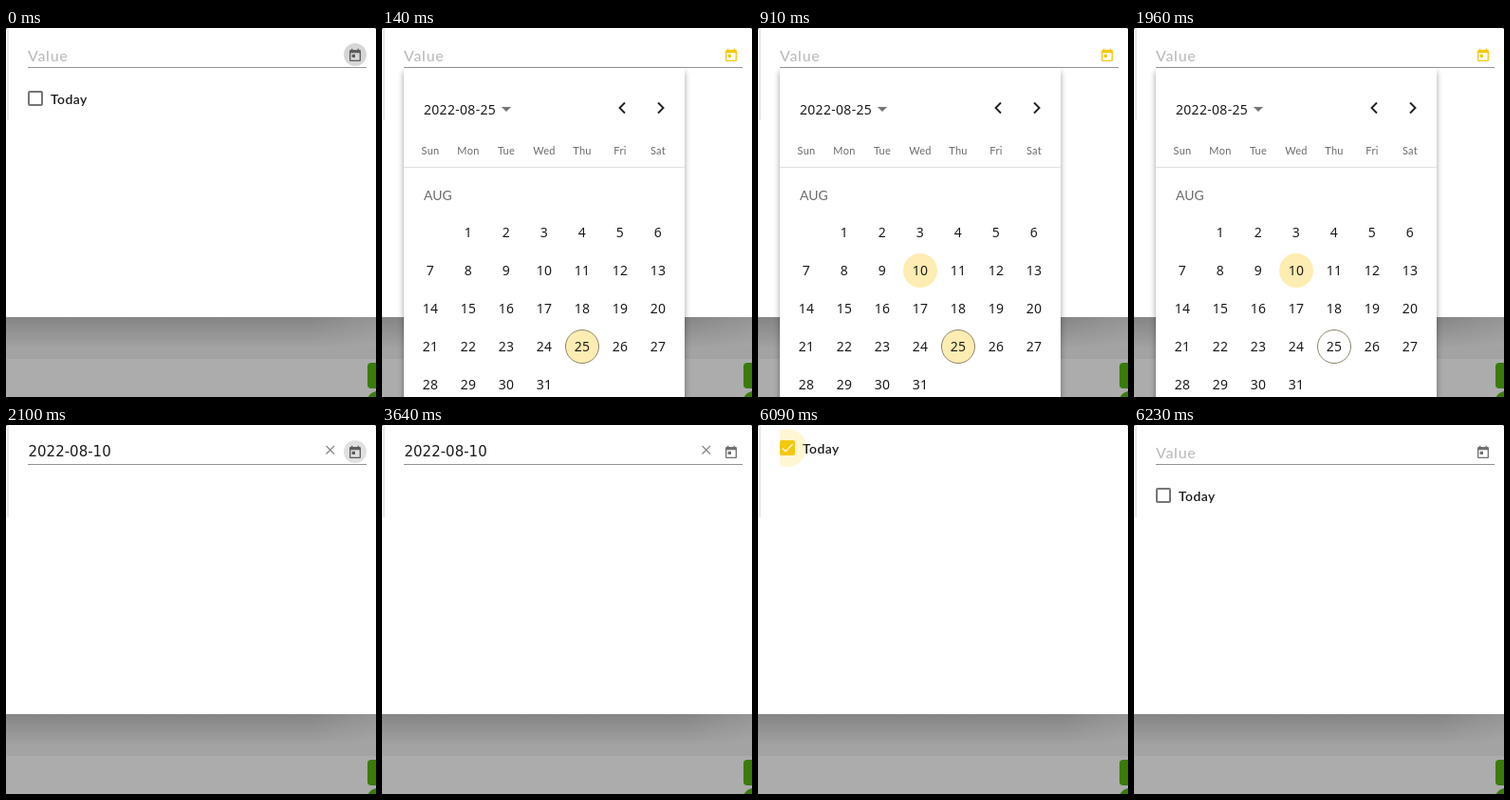
These frames come from a looping animation (390x388 px, 7280 ms). An HTML page:

```html
<!DOCTYPE html>
<html lang="en">
<head>
<meta charset="utf-8">
<title>Date field</title>
<style>
  html, body { margin: 0; width: 100%; height: 100%; overflow: hidden; background: #fff; }
  svg { display: block; width: 390px; height: 388px; }
  text { font-family: Lato, sans-serif; }
  .label { font-size: 16px; font-weight: 500; letter-spacing: .7px; fill: #bcbcbc; }
  .today { font-size: 14px; font-weight: 600; letter-spacing: .4px; fill: #1c1c1c; }
  .date { font: 15px "DejaVu Sans", sans-serif; fill: #1c1c1c; }
  .week { font-size: 11px; letter-spacing: .3px; fill: #6b6b6b; text-anchor: middle; }
  .month { font-size: 14px; fill: #6b6b6b; }
  .day, .period { font: 14px "Noto Sans", sans-serif; letter-spacing: .3px; fill: #1c1c1c; }
  .day { text-anchor: middle; }
  .popup { filter: drop-shadow(0 2px 3px rgba(0, 0, 0, .38)); }
</style>
</head>
<body>
<svg viewBox="0 0 390 388">
  <defs>
    <linearGradient id="shade" x1="0" y1="0" x2="0" y2="1">
      <stop offset="0" stop-color="#858585"/>
      <stop offset="1" stop-color="#a0a0a0"/>
    </linearGradient>
    <linearGradient id="fade">
      <stop offset="0" stop-color="#adadad" stop-opacity="0"/>
      <stop offset="1" stop-color="#adadad" stop-opacity=".4"/>
    </linearGradient>
    <clipPath id="edge"><rect x="23" y="0" width="60" height="100"/></clipPath>
  </defs>

  <rect width="390" height="388" fill="#fff"/>
  <rect x="1" width="2" height="97" fill="#e8e8e8"/>
  <path d="M0 0h1v1h-1zM389 0h1v1h-1z" fill="#777"/>
  <rect y="304" width="390" height="31" fill="url(#shade)"/>
  <rect x="320" y="304" width="70" height="31" fill="url(#fade)"/>
  <rect y="335" width="390" height="13" fill="#a3a3a3"/>
  <rect y="348" width="390" height="40" fill="#acacac"/>
  <rect x="381" y="352" width="20" height="27" rx="4" fill="#397c08"/>
  <circle cx="391" cy="392" r="10" fill="#397c08"/>

  <g id="field">
    <rect x="23" y="41" width="357" height="1" fill="#949494"/>
    <text id="label" class="label" x="23" y="35">Value</text>
    <g id="filled">
      <text class="date" x="23.5" y="33">2022-08-10</text>
      <path d="M337.5 22l8.5 8.5M346 22l-8.5 8.5" stroke="#858585" stroke-width="1.2"/>
    </g>
    <circle id="focus" cx="368" cy="28" r="12"/>
    <path id="icon" transform="translate(360 21) scale(.6667)" d="M19 3h-1V1h-2v2H8V1H6v2H5c-1.11 0-2 .9-2 2v14c0 1.1.89 2 2 2h14c1.1 0 2-.9 2-2V5c0-1.1-.9-2-2-2zm0 16H5V8h14zM7 10h5v5H7z"/>
  </g>

  <g id="check">
    <rect id="box" x="24" y="67" width="14" height="14" rx="1" stroke-width="2"/>
    <path id="tick" d="M25.7 74.5l3.3 3.2 7.5-7.5" fill="none" stroke="#fff" stroke-width="1.6"/>
    <text class="today" x="47" y="80">Today</text>
    <g clip-path="url(#edge)">
      <circle id="ripple" cx="31" cy="74" r="20" fill="#ffc800" opacity=".17"/>
    </g>
  </g>

  <g id="popup">
    <rect class="popup" x="23" y="44" width="296" height="360" fill="#fff"/>
    <rect x="23" y="42" width="296" height="4" fill="#fff"/>
    <text class="period" x="44" y="91">2022-08-25</text>
    <path d="M126 83h10l-5 5z" fill="#757575"/>
    <path d="M256 78.5l-5.5 5.5 5.5 5.5M291 78.5l5.5 5.5-5.5 5.5" fill="none" stroke="#222" stroke-width="1.9"/>
    <rect x="23" y="146" width="296" height="1" fill="#e0e0e0"/>
    <text class="month" x="44" y="181">AUG</text>
    <circle id="hover" r="18" fill="#feedb2"/>
    <circle id="current" r="17.5" stroke="#8a8468"/>
    <g id="days"></g>
  </g>
</svg>
<script>
const LOOP = 7280;
const $ = id => document.getElementById(id);
const show = (id, on) => $(id).setAttribute("display", on ? "inline" : "none");
const set = (id, name, value) => $(id).setAttribute(name, value);

// August 2022 starts on a Monday
const cell = day => [51 + 40 * (day % 7), 215 + 40 * Math.floor(day / 7)];

function addText(cls, x, y, str) {
  const el = document.createElementNS("http://www.w3.org/2000/svg", "text");
  el.setAttribute("class", cls);
  el.setAttribute("x", x);
  el.setAttribute("y", y);
  el.textContent = str;
  $("days").append(el);
}

function place(id, day) {
  const [x, y] = cell(day);
  set(id, "cx", x);
  set(id, "cy", y);
}

["Sun", "Mon", "Tue", "Wed", "Thu", "Fri", "Sat"].forEach((name, i) =>
  addText("week", 51 + 40 * i, 133, name));
for (let d = 1; d <= 31; d++) {
  const [x, y] = cell(d);
  addText("day", x, y + 5, d);
}
place("current", 25);

function draw(t) {
  const within = (a, b) => t >= a && t < b;
  const open = within(140, 2100);
  const filled = within(2100, 3710);
  const checked = within(4970, 6230);
  const focused = t < 140 || within(2100, 3640);

  show("popup", open);
  show("field", !checked);
  show("filled", filled);
  show("label", !filled);
  show("focus", focused);
  set("focus", "fill", t < 140 ? "#d6d6d6" : "#e0e0e0");
  set("icon", "fill", open ? "#f3c812" : focused ? "#5c5c5c" : "#707070");

  show("check", !open && !filled);
  set("check", "transform", `translate(0 ${checked ? -50 : 0})`);
  set("box", "fill", checked ? "#f3c812" : "#fff");
  set("box", "stroke", checked ? "#f3c812" : "#757575");
  show("tick", checked);
  show("ripple", within(4900, 4970) || within(6090, 6230));

  show("hover", t >= 630);
  place("hover", t < 700 ? 3 : t < 910 ? 9 : 10);
  set("current", "fill", t < 1960 ? "#feedb2" : "#fff");
}

function tick() {
  draw(performance.now() % LOOP);
  requestAnimationFrame(tick);
}
tick();
</script>
</body>
</html>
```
